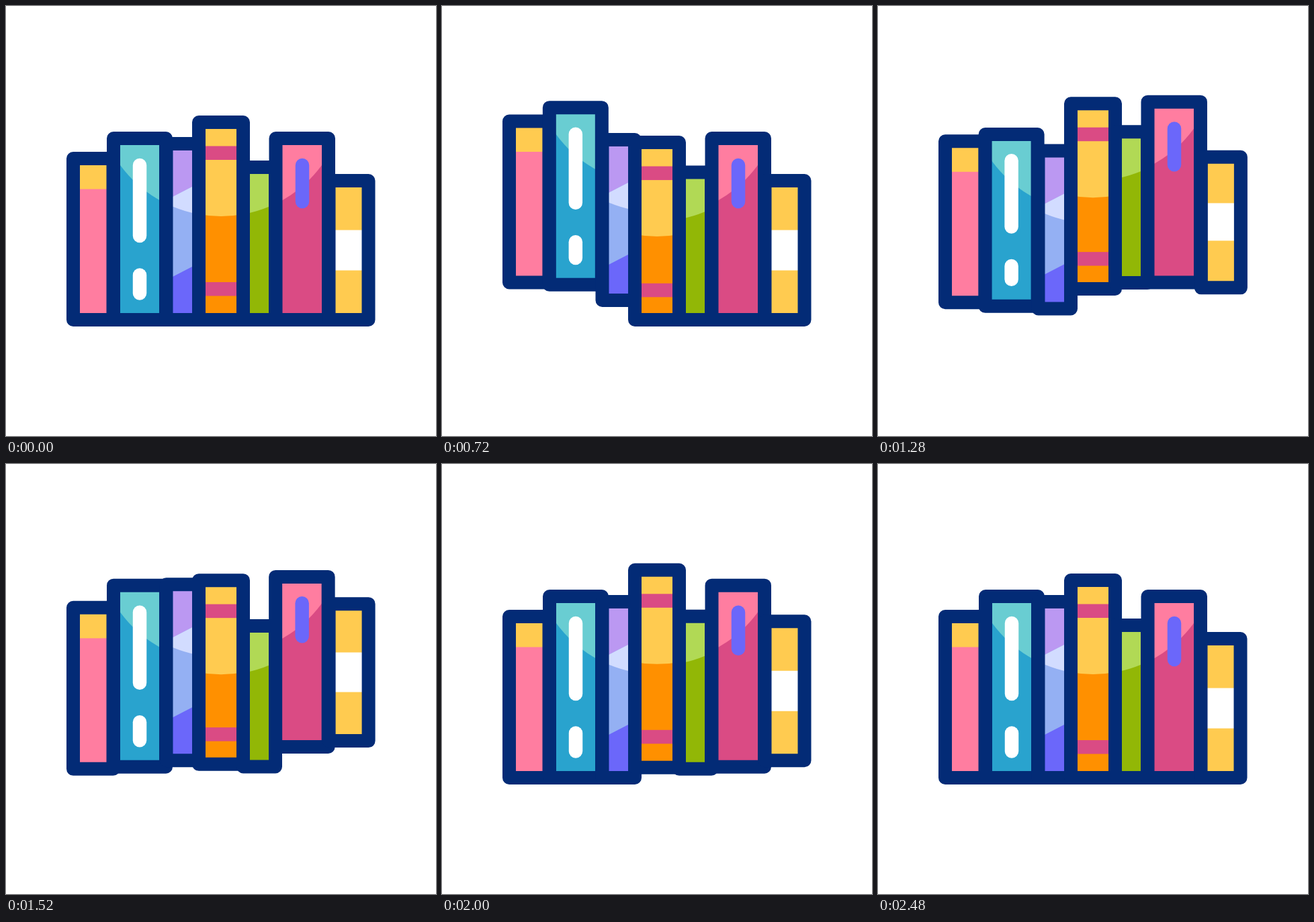
Animation, 640 px wide and 640 px high, one loop 3000 ms. Source, as an HTML page with a canvas:

```html
<!DOCTYPE html>
<html lang="en">
<head>
<meta charset="utf-8">
<title>Hopping books</title>
<style>
  html, body { margin: 0; width: 100%; height: 100%; overflow: hidden; background: #fff; }
  canvas { display: block; width: 640px; height: 640px; }
</style>
</head>
<body>
<canvas id="stage" width="640" height="640"></canvas>
<script>
const g = document.getElementById('stage').getContext('2d');

const LOOP = 3000, STEP = 40, STAGGER = 120, GROUND = 467;
const NAVY = '#032b76', PINK = '#ff7da0', ROSE = '#da4b84', YELLOW = '#ffcb50',
      VIOLET = '#6b67fa', WHITE = '#fff';

// Hops: take-off, peak, landing (ms), height (px)
const HOPS = [[413, 720, 1080, 55.5], [1080, 1280, 1448, 25.7], [1448, 1600, 1760, 15.4]];
// Squash keys: time (ms), amount
const SQUASH = [[120, 0], [390, 1], [720, 0], [1080, 1], [1280, 0]];

function lift(u) {
  for (const [start, peak, end, height] of HOPS) {
    if (u <= start || u >= end) continue;
    const f = u < peak ? (peak - u) / (peak - start) : (u - peak) / (end - peak);
    return height * (1 - f ** 3);
  }
  return 0;
}

function squash(u) {
  for (let i = 1; i < SQUASH.length; i++) {
    const [t0, a] = SQUASH[i - 1], [t1, b] = SQUASH[i];
    if (u < t0 || u >= t1) continue;
    return a + (b - a) * (1 - Math.cos(Math.PI * (u - t0) / (t1 - t0))) / 2;
  }
  return 0;
}

function band(color, y0, y1) {
  g.fillStyle = color;
  g.fillRect(0, y0, 640, y1 - y0);
}

// The highlight is one large circle spanning the whole row
function dome(q) {
  g.beginPath();
  g.arc(320, 127 + q, 186, 0, 2 * Math.PI);
}

function shine(color, q) {
  dome(q);
  g.fillStyle = color;
  g.fill();
}

function pill(color, x, y0, y1) {
  g.strokeStyle = color;
  g.lineWidth = 20.5;
  g.lineCap = 'round';
  g.beginPath();
  g.moveTo(x, y0);
  g.lineTo(x, y1);
  g.stroke();
}

function slant(color, q) {
  g.beginPath();
  g.moveTo(248, 284 + q);
  g.lineTo(277, 269 + q);
  g.lineTo(287, 264 + q);
  g.lineTo(287, 383 + q * 0.48);
  g.lineTo(277, 388 + q * 0.48);
  g.lineTo(248, 403 + q * 0.48);
  g.lineTo(238, 408 + q * 0.48);
  g.lineTo(238, 289 + q);
  g.fillStyle = color;
  g.fill();
}

// x0, x1, top: outline centre; squash: px lost at full squash; sway: sideways px
const BOOKS = [
  { x0: 100, x1: 159.5, top: 227, squash: 16, sway: 0, base: PINK,
    art: q => band(YELLOW, 0, 272.5 + q) },
  { x0: 160, x1: 238, top: 197, squash: 21.6, sway: -0.6, base: '#29a3ce',
    art: q => {
      shine('#69cdd2', q);
      pill(WHITE, 199, 237 + q * 0.95, 342 + q * 0.47);
      pill(WHITE, 199, 400.5 + q * 0.47, 427.5 - q * 0.05);
    } },
  { x0: 238.5, x1: 287, top: 205, squash: 27.8, sway: 0, base: VIOLET,
    art: q => {
      shine('#bb98f2', q);
      slant('#94b0f3', q);
      dome(q);
      g.clip();
      slant('#d2dcff', q);
    } },
  { x0: 287, x1: 353, top: 173, squash: 31, sway: 0, base: '#ff9000',
    art: q => {
      shine(YELLOW, q);
      band(ROSE, 208.5 + q, 229 + q);
      band(ROSE, 411 + q * 0.06, 431.5 + q * 0.06);
    } },
  { x0: 353, x1: 401, top: 240, squash: 18, sway: 0, base: '#92b706',
    art: q => shine('#b1d955', q) },
  { x0: 401.5, x1: 480, top: 197, squash: 28.8, sway: -0.6, base: ROSE,
    art: q => {
      shine(PINK, q);
      pill(VIOLET, 441, 237 + q * 0.96, 291 + q * 0.66);
    } },
  { x0: 480.5, x1: 539.5, top: 260, squash: 26, sway: 0.8, base: YELLOW,
    art: q => band(WHITE, 333.5 + q * 0.61, 393.5 + q * 0.28) }
];

function drawBook(book, u) {
  const s = squash(u), q = book.squash * s;
  const box = [book.x0, book.top + q, book.x1 - book.x0, GROUND - book.top - q];
  g.save();
  g.translate(book.sway * s, -lift(u));
  g.save();
  g.beginPath();
  g.rect(...box);
  g.clip();
  band(book.base, 0, 640);
  book.art(q);
  g.restore();
  g.strokeStyle = NAVY;
  g.lineWidth = 20;
  g.lineJoin = 'round';
  g.strokeRect(...box);
  g.restore();
}

function draw(now) {
  const t = Math.floor((now % LOOP) / STEP) * STEP;
  g.fillStyle = WHITE;
  g.fillRect(0, 0, 640, 640);
  BOOKS.forEach((book, i) => drawBook(book, t - i * STAGGER));
}

const start = performance.now();
function tick() {
  draw(performance.now() - start);
  requestAnimationFrame(tick);
}
tick();
</script>
</body>
</html>
```
